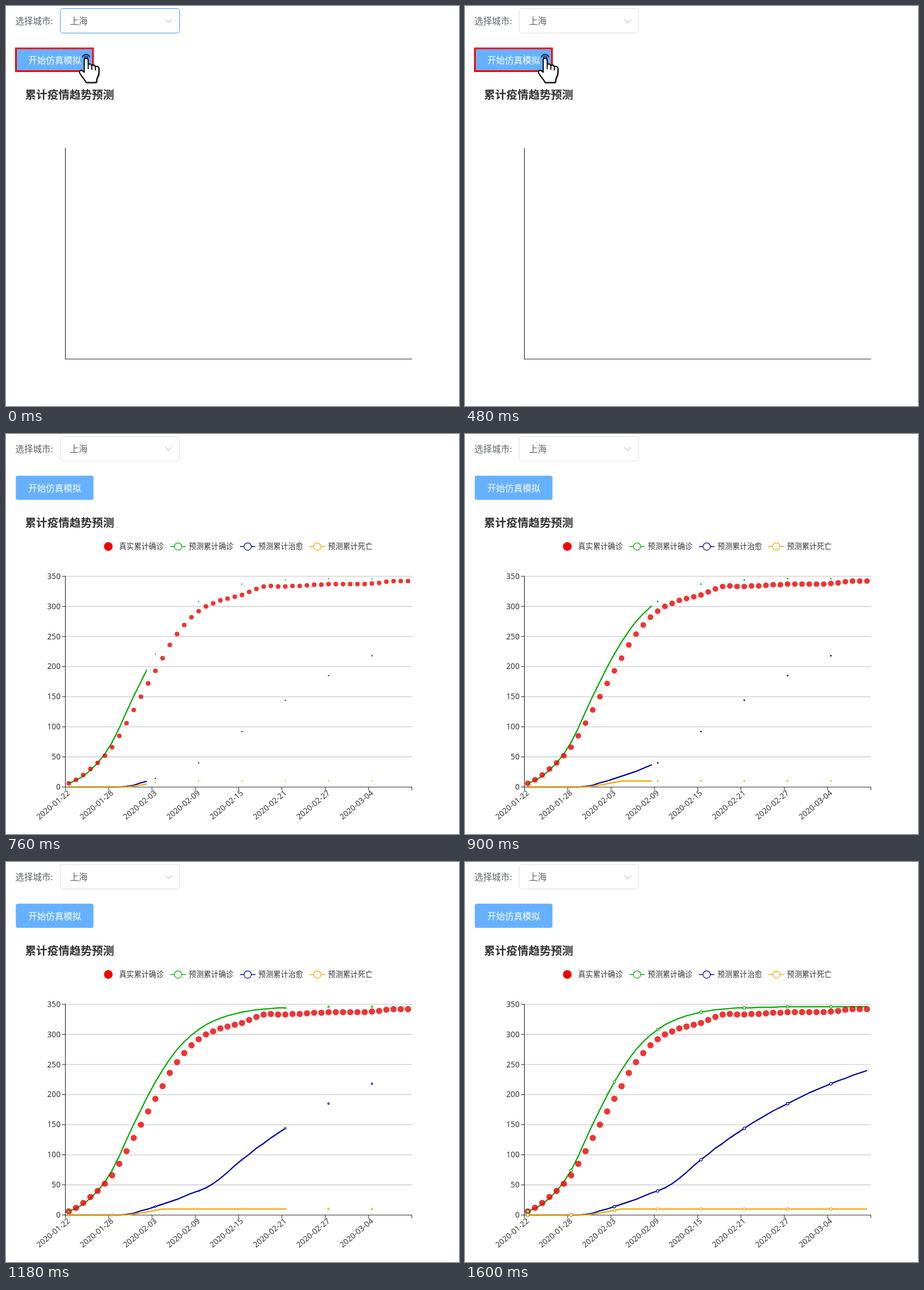
Animation, 797 px wide and 703 px high, one loop 2.27 s. Source, as an HTML page:

```html
<!DOCTYPE html>
<html lang="zh-CN">
<head>
<meta charset="utf-8">
<title>累计疫情趋势预测</title>
<style>
html, body { margin: 0; width: 100%; height: 100%; overflow: hidden; background: #fff; }
svg { display: block; }
text { font-family: "Noto Sans CJK SC", "Noto Sans CJK", sans-serif; fill: #333; }
.num text { font-family: "Noto Sans", "Open Sans", sans-serif; font-size: 13.7px; text-anchor: end; }
.form text { font-size: 15.5px; fill: #606266; }
.legend text { font-size: 13.1px; }
</style>
</head>
<body>
<svg width="797" height="703" viewBox="0 0 797 703">
  <defs><clipPath id="wipe"><rect id="wipeRect" x="104" y="244" width="0" height="382"/></clipPath></defs>
  <g class="form">
    <text x="16.5" y="31.8">选择城市:</text>
    <rect id="select" x="95.5" y="4.5" width="210" height="43" rx="4.4" fill="#fff"/>
    <text x="112.5" y="32.3">上海</text>
    <path d="M280.3 23.3L286 29.2L291.7 23.3" fill="none" stroke="#c0c4cc" stroke-width="1.1"/>
    <rect id="button" x="17.3" y="73.2" width="136.6" height="42.5" rx="3.5"/>
    <text x="39.3" y="101.3" style="fill:#fff">开始仿真模拟</text>
  </g>
  <text x="33.5" y="163" font-size="19.6" font-weight="700">累计疫情趋势预测</text>
  <g id="scale" class="num"></g>
  <path d="M104.5 249.5V621M104 620.5H714.5" fill="none" stroke="#333" stroke-width="1.2"/>
  <g id="legend" class="legend"></g>
  <g id="plot">
    <g id="lines" clip-path="url(#wipe)" fill="none" stroke-width="2.2" stroke-linejoin="bevel"></g>
    <g id="dots" fill="#e00" fill-opacity=".8"></g>
    <g id="rings" fill="#fff" stroke-width="1.2"></g>
  </g>
  <g id="pointer">
    <rect x="17.5" y="74.5" width="135.5" height="40" fill="none" stroke="#f00" stroke-width="3"/>
    <g fill="none" stroke="#1c1c3c" stroke-width="1.9" stroke-linecap="round">
      <path d="M134.6 89.5A6.9 6.9 0 0 1 147.4 89.5"/>
      <path d="M137.6 90.6A3.7 3.7 0 0 1 144.4 90.6" stroke-width="1.5"/>
    </g>
    <g transform="translate(0 -.6)">
      <path id="shade" fill="#9a9ab8" stroke="#9a9ab8" stroke-width="2" transform="translate(1.2 1.2)"/>
      <path id="hand" fill="#fff" stroke="#000" stroke-width="2" stroke-linejoin="round"/>
      <path d="M144.6 104V111M151 105V112M157.3 107V113" fill="none" stroke="#000" stroke-width="1.8" stroke-linecap="round"/>
    </g>
  </g>
</svg>
<script>
const LOOP = 2270, START = 270, STEP = 70, LAST = 20;
const LEFT = 104.5, WIDTH = 609.5, COUNT = 48, SLOT = WIDTH / COUNT;
const $ = id => document.getElementById(id);

function add(parent, tag, attrs, text) {
  const el = document.createElementNS('http://www.w3.org/2000/svg', tag);
  for (const key in attrs) el.setAttribute(key, attrs[key]);
  if (text) el.textContent = text;
  return parent.appendChild(el);
}

const px = i => LEFT - 0.4 + (i + 0.5) * SLOT;
const py = v => 620.4 - v * 1.058;

// Catmull-Rom curve through evenly spaced keys, rounded to whole cases.
const spline = (gap, keys) => i => {
  const n = Math.floor(i / gap), u = i / gap - n;
  const [a, b, c, d] = [-1, 0, 1, 2].map(k => keys[Math.max(0, Math.min(keys.length - 1, n + k))]);
  const v = b + u * (c - a + u * (2 * a - 5 * b + 4 * c - d + u * (3 * (b - c) + d - a))) / 2;
  return Math.max(0, Math.round(v));
};

const actual = spline(3, [6, 30, 66, 128, 193, 254, 292, 310, 319, 333, 333, 335, 337, 337, 338, 342]);
const series = [
  ['#0a0', spline(3, [6, 28, 74, 151, 221, 275, 308, 327, 337, 342, 344, 345, 346])],
  ['#009', spline(4, [0, 0, 1, 14, 31, 52, 92, 128, 159, 185, 208, 227, 243])],
  ['#eeaa00', i => 10 * Math.max(0, Math.min(1, (i - 8) / 5)) ** 1.2]
];

function buildScale() {
  const g = $('scale');
  for (let i = 0; i < 8; i++) {
    const y = 250.1 + 52.9 * i;
    if (i < 7) add(g, 'path', { d: `M105 ${y}H714`, stroke: '#ccc', 'stroke-width': 1.3 });
    add(g, 'path', { d: `M98.5 ${y}H104.5`, stroke: '#333', 'stroke-width': 1.1 });
    add(g, 'text', { x: 96, y: y + 4.6 }, String(350 - 50 * i));
  }
  for (let i = 0; i < 9; i++) {
    const x = LEFT + i * 6 * SLOT;
    add(g, 'path', { d: `M${x} 620.5V626`, stroke: '#333', 'stroke-width': 1.1 });
    if (i === 8) break;
    const day = new Date(Date.UTC(2020, 0, 22 + 6 * i)).toISOString().slice(0, 10);
    add(g, 'text', { transform: `translate(${px(6 * i)} 628.6) rotate(-40)`, y: 4.9 }, day);
  }
}

function buildLegend() {
  const g = $('legend');
  add(g, 'circle', { cx: 180, cy: 197.7, r: 7.6, fill: '#e00' });
  add(g, 'text', { x: 199, y: 202.3 }, '真实累计确诊');
  ['确诊', '治愈', '死亡'].forEach((name, i) => {
    const x = 302.7 + 122.5 * i, stroke = series[i][0];
    add(g, 'path', { d: `M${x - 13.6} 197.8H${x + 13.6}`, stroke, 'stroke-width': 1.4 });
    add(g, 'circle', { cx: x, cy: 197.8, r: 6.5, fill: '#fff', stroke, 'stroke-width': 1.2 });
    add(g, 'text', { x: x + 18.9, y: 202.3 }, '预测累计' + name);
  });
}

function buildPlot() {
  const days = [...Array(COUNT).keys()];
  for (const [stroke, value] of series) {
    add($('lines'), 'polyline', { stroke, points: days.map(i => px(i) + ',' + py(value(i))).join(' ') });
    for (let i = 0; i < COUNT; i += 6)
      add($('rings'), 'circle', { cx: px(i), cy: py(value(i)), stroke });
  }
  for (const i of days) add($('dots'), 'circle', { cx: px(i), cy: py(actual(i)) });
}

function buildHand() {
  const d = 'M137.6 117V95.5Q137.8 92 141 92Q144.4 92 144.6 95.5V103.2Q148 101 151 105' +
    'Q154.8 102.8 157.3 107Q162.5 105.5 163.4 110V118Q163.2 122 160.8 126Q159.6 129 159.2 133' +
    'Q159 135 157 135H142Q140 135 139.6 132.5Q137 128.5 134 125Q131 121 129.4 118' +
    'Q128.6 114 132 113.6Q135 114 137.6 117Z';
  $('hand').setAttribute('d', d);
  $('shade').setAttribute('d', d);
}

const clamp = v => Math.max(0, Math.min(1, v));
const mix = (a, b, k) => `rgb(${a.map((v, i) => Math.round(v + (b[i] - v) * k))})`;
const setRadius = (id, r) => { for (const c of $(id).children) c.setAttribute('r', r); };
const show = (id, on) => $(id).setAttribute('visibility', on ? 'visible' : 'hidden');

function draw(t) {
  const step = t < START ? 0 : Math.min(LAST, Math.floor((t - START) / STEP) + 1);
  const press = clamp(1 - Math.abs(step - 2) / 2);
  const blur = clamp(step / 4) ** 2;
  $('button').setAttribute('fill', mix([102, 177, 255], [58, 142, 230], press));
  $('select').setAttribute('stroke', mix([64, 158, 255], [220, 223, 230], blur));
  show('pointer', step < 6);
  show('scale', step >= 5);
  show('legend', step >= 5);
  show('plot', step >= 6);

  const p = clamp(0.235 + 0.0665 * (step - 8));
  $('wipeRect').setAttribute('width', p < 1 ? 0.5 + WIDTH * p : WIDTH + 4);
  setRadius('dots', 5.5 * (1 - (1 - p) ** 5));
  setRadius('rings', 2.3 * p);
}

buildScale();
buildLegend();
buildPlot();
buildHand();

const begin = performance.now();
function tick() {
  draw((performance.now() - begin) % LOOP);
  requestAnimationFrame(tick);
}
tick();
</script>
</body>
</html>
```
